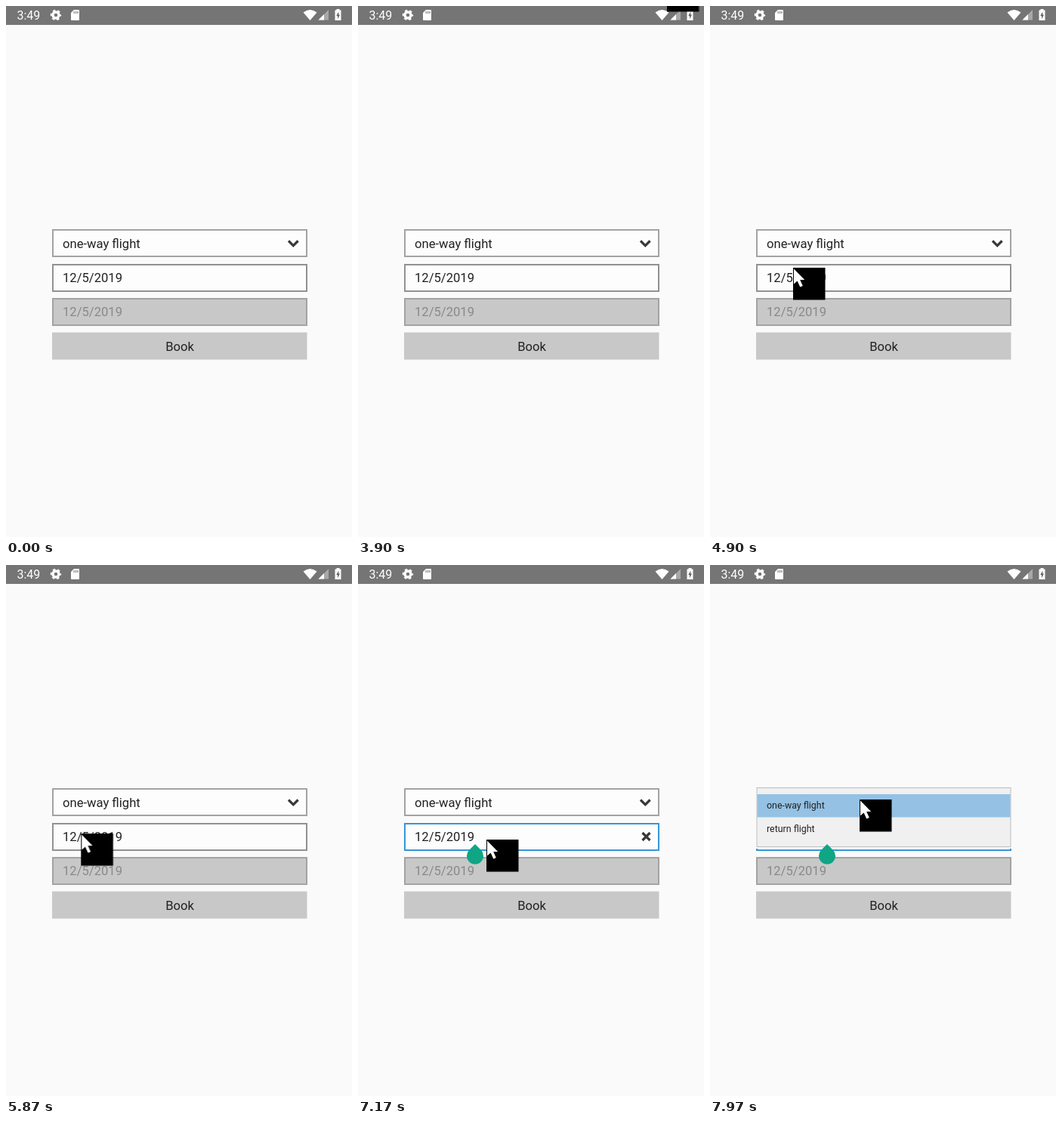
An HTML page that plays this animation: 458x702 px, repeating every 8000 ms.

```html
<!DOCTYPE html>
<html lang="en">
<head>
<meta charset="utf-8">
<title>Flight booking form</title>
<style>
  html, body { margin: 0; width: 100%; height: 100%; overflow: hidden; background: #fafafa; }
  svg { display: block; width: 458px; height: 702px; }
  text { font: 16.6px Roboto, sans-serif; fill: #222; }
  .clock { font-size: 16px; fill: #fff; }
  .small { font-size: 12.4px; }
  .box { fill: #fdfdfd; stroke: #a3a3a3; stroke-width: 2; }
  .icon { fill: none; stroke: #383838; stroke-width: 3.2; }

  .pointer, .shown { animation: 8s linear infinite; }
  .pointer { animation-name: move; }
  .shown { opacity: 0; animation-timing-function: step-end; }
  .arrive { animation-name: arrive; }
  .focus { animation-name: focus; }
  .handle { animation-name: handle; }
  .popup { animation-name: popup; animation-timing-function: linear; }

  @keyframes arrive { 0% { opacity: 0 } 48.72%, 100% { opacity: 1 } }
  @keyframes focus { 0% { opacity: 0 } 80%, 100% { opacity: 1 } }
  @keyframes handle { 0% { opacity: 0 } 81.2%, 100% { opacity: 1 } }
  @keyframes popup { 0%, 97% { opacity: 0 } 98%, 100% { opacity: 1 } }

  @keyframes move {
    0%, 48.75% { transform: translate(409px, -36px) }
    51.25%, 58% { transform: translate(319px, 164px) }
    60.4% { transform: translate(104px, 357px) }
    61.25%, 63.5% { transform: translate(110px, 346px) }
    65.6% { transform: translate(85px, 352px) }
    67.6%, 73% { transform: translate(94px, 356px) }
    73.37% { transform: translate(99px, 355px) }
    77.6%, 79.6% { transform: translate(170px, 365px) }
    82%, 89.75% { transform: translate(170px, 363px) }
    92.1%, 94% { transform: translate(195px, 301px) }
    95.1%, 100% { transform: translate(198px, 310px) }
  }
</style>
</head>
<body>
<svg viewBox="0 0 458 702">
  <rect width="458" height="702" fill="#fafafa"/>

  <!-- status bar -->
  <rect width="458" height="25" fill="#757575"/>
  <text class="clock" x="14.5" y="18">3:49</text>
  <g fill="none" stroke="#fff">
    <circle cx="66" cy="12" r="4" stroke-width="3.4"/>
    <circle cx="66" cy="12" r="6.2" stroke-width="2" stroke-dasharray="3.3 3.19" stroke-dashoffset="1.65"/>
  </g>
  <path d="M90 5h6q1 0 1 1v12q0 1-1 1h-9q-1 0-1-1V9z" fill="#fff"/>
  <path d="M90.2 7v3M92.6 7v3M95 7v3" stroke="#757575" stroke-width="1.1"/>
  <path d="M393.5 8.5Q402.5 1.5 411.5 8.5L402.5 19z" fill="#fff"/>
  <path d="M427 5v13.5H413.5z" fill="#a8a8a8"/>
  <path d="M421 11v7.5h-7.5z" fill="#fff"/>
  <path d="M437.5 4h4v1.5h2V19h-8V5.500h2z" fill="#fff"/>
  <path d="M440.300 7.500l-3 5.500h1.700v4l3-5.500h-1.700z" fill="#606060"/>

  <!-- form -->
  <rect class="box" x="62" y="296" width="336" height="35"/>
  <text x="75" y="319.500">one-way flight</text>
  <path class="icon" d="M374 310.500l6.300 6.300 6.300-6.300"/>

  <rect class="box" x="62" y="342" width="336" height="35" style="stroke:#929294"/>
  <g class="shown focus">
    <rect class="box" x="62" y="342" width="336" height="35" style="stroke:#3796d8"/>
    <path class="icon" d="M376.500 354l10 10m0-10l-10 10"/>
  </g>
  <text x="75" y="364.700">12/5/2019</text>

  <rect class="box" x="62" y="387" width="336" height="35" style="fill:#c8c8c8"/>
  <text x="75" y="410" style="fill:#898989">12/5/2019</text>

  <rect x="61" y="431.500" width="337.500" height="36" fill="#c8c8c8"/>
  <text x="230" y="456.300" text-anchor="middle">Book</text>

  <!-- open list -->
  <g class="shown popup">
    <rect x="61" y="294" width="338" height="81" fill="#fafafa"/>
    <rect x="62" y="294.500" width="336" height="78" fill="#f0f0f0" stroke="#bdbdbd"/>
    <rect x="62.500" y="303" width="335" height="30.500" fill="#94c1e4"/>
    <text class="small" x="75" y="322">one-way flight</text>
    <text class="small" x="75" y="352.500">return flight</text>
  </g>

  <path class="shown handle" d="M155 369l8 8a11 11 0 1 1-16 0z" fill="#0fa585"/>

  <g class="pointer">
    <g class="shown arrive">
      <rect width="42.500" height="42.500"/>
      <path d="M1 1.500V21.500l4.600-4 3.700 8 3.500-1.600-3.600-7.900h6z" fill="#fff"/>
    </g>
  </g>
</svg>
</body>
</html>
```
